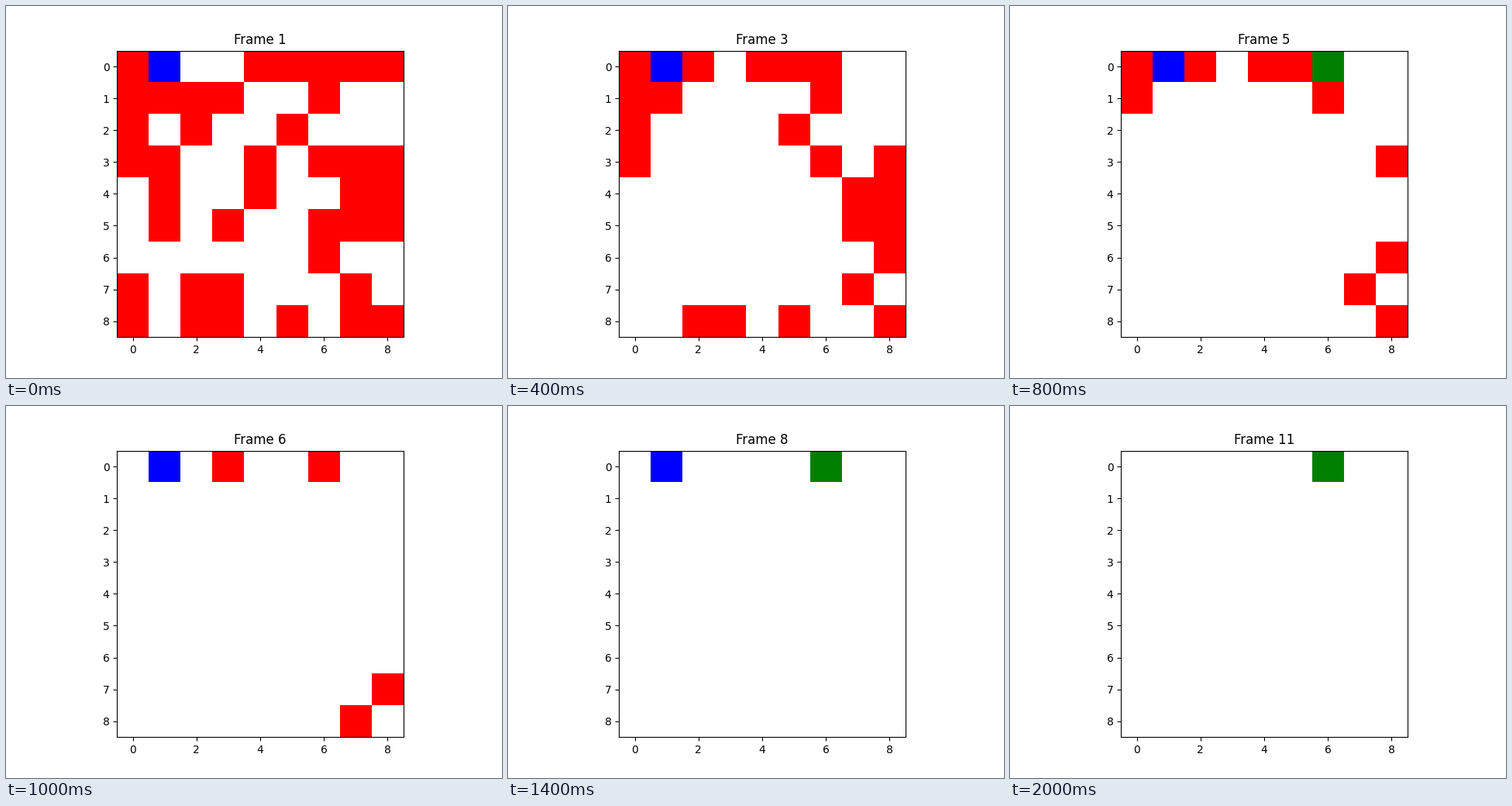
Write a matplotlib script that moves like this. It is 640 px wide and 480 px high and loops after 2200 ms.

```python
import numpy as np
import matplotlib.pyplot as plt
from matplotlib.animation import FuncAnimation
from matplotlib.colors import ListedColormap

STEPS = 11
WHITE, RED, BLUE, GREEN = range(4)
AGENT, GOAL = (0, 1), (0, 6)  # row, column

START = """
#...#####
####..#..
#.#..#...
##..#.###
.#..#..##
.#.#..###
......#..
#.##...#.
#.##.#.##
"""


def neighbours(grid):
    """Sum over the four direct neighbours, nothing beyond the border."""
    p = np.pad(grid, 1)
    return p[:-2, 1:-1] + p[2:, 1:-1] + p[1:-1, :-2] + p[1:-1, 2:]


def evolve(grid, steps):
    """A cell is on when more than half of its neighbours were on."""
    degree = neighbours(np.ones_like(grid))
    for _ in range(steps):
        grid = (2 * neighbours(grid) > degree).astype(int)
    return grid


def picture(step):
    cells = evolve(start, step)
    if cells[GOAL] == WHITE:
        cells[GOAL] = GREEN
    if step < STEPS - 1:
        cells[AGENT] = BLUE
    if step == STEPS - 2:  # the agent reaches the goal
        cells[GOAL] = BLUE
    return cells


start = np.array([[int(c == "#") for c in row] for row in START.split()])

fig, ax = plt.subplots(figsize=(6.4, 4.8), dpi=100)
cmap = ListedColormap(["white", "red", "blue", "green"])
image = ax.imshow(picture(0), cmap=cmap, vmin=0, vmax=3)
title = ax.set_title("Frame 1")


def update(step):
    image.set_data(picture(step))
    title.set_text(f"Frame {step + 1}")
    return image, title


anim = FuncAnimation(fig, update, frames=STEPS, interval=200,
                     repeat=True, repeat_delay=0, blit=False)
plt.show()
```
